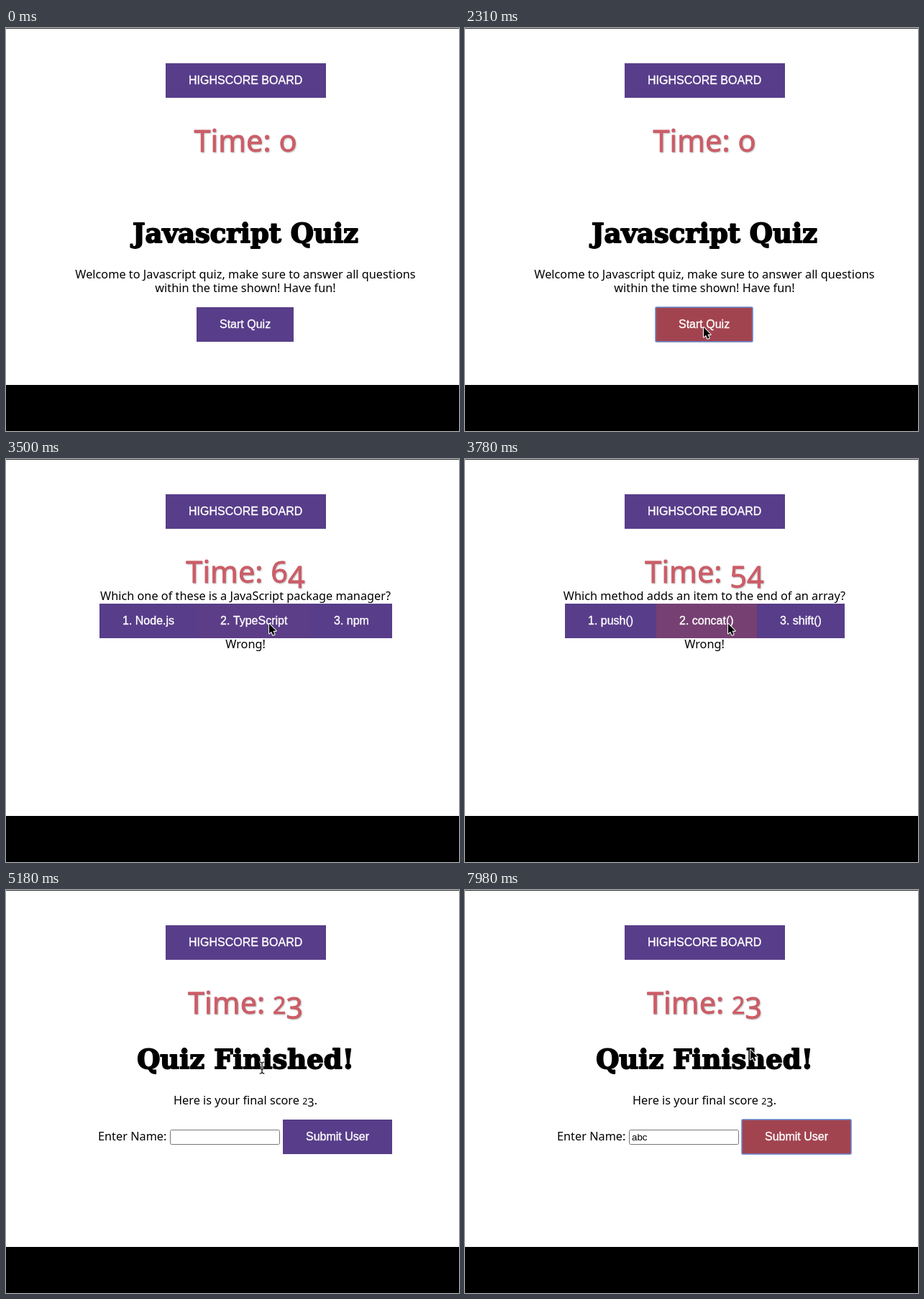
These frames come from a looping animation (630 px wide and 560 px high, 8 s). An HTML page with a canvas:

```html
<!DOCTYPE html>
<html lang="en">
<head>
<meta charset="utf-8">
<title>Javascript Quiz</title>
<style>
  html, body { margin: 0; width: 630px; height: 560px; overflow: hidden; background: #fff; }
  canvas { display: block; }
</style>
</head>
<body>
<canvas id="stage" width="630" height="560"></canvas>
<script>
const g = document.getElementById('stage').getContext('2d');
const LOOP = 8000, STEP = 70, MID = 333;
const SANS = '"Noto Sans", sans-serif', UI = '"Liberation Sans", Arial, sans-serif';
const PURPLE = [88, 61, 138], RED = [162, 68, 80];

// start time, seconds left, question, answers
const questions = [
  [2450, 75, 'What is the correct way to declare a variable in JavaScript?',
    ['1. var colour = 10;', '2. variable colour = 10;', '3. v colour = 10;']],
  [3490, 64, 'Which one of these is a JavaScript package manager?',
    ['1. Node.js', '2. TypeScript', '3. npm']],
  [3710, 54, 'Which method adds an item to the end of an array?',
    ['1. push()', '2. concat()', '3. shift()']],
  [3920, 44, 'Which keyword creates a constant in JavaScript?',
    ['1. let', '2. static', '3. const']],
  [4060, 34, 'What are all the looping structures in Javascript?',
    ['1. For', '2. While', '3. do-while loops']]
];
const FINISH = 4270;

// time, x, y, pointer (0 hidden, 1 arrow, 2 text beam)
const path = [
  [0, 352, 492, 0], [70, 352, 488, 1], [450, 330, 470, 1], [840, 340, 452, 1],
  [1150, 350, 462, 1], [1400, 336, 448, 1], [1680, 336, 448, 1], [2030, 332, 416, 1],
  [2450, 332, 416, 1], [3150, 366, 229, 1], [4270, 366, 229, 1], [4550, 374, 367, 1],
  [4760, 356, 247, 2], [5180, 356, 247, 2], [5390, 392, 312, 1], [5670, 300, 344, 2],
  [6090, 300, 344, 0], [7000, 300, 344, 1], [7350, 430, 345, 1], [7700, 430, 345, 1],
  [7910, 397, 222, 1], [LOOP, 397, 222, 1]
];

const clamp = v => Math.max(0, Math.min(1, v));
const lerp = (a, b, p) => a + (b - a) * p;
const hover = (t, since) => clamp((t - since) / 170);

// Text, thickened by an outline of the given width
function text(str, x, y, font, color = '#000', outline = 0) {
  g.font = font;
  g.fillStyle = g.strokeStyle = color;
  g.lineJoin = 'round';
  g.lineWidth = outline;
  if (outline) g.strokeText(str, x, y);
  g.fillText(str, x, y);
}

// Sans text with old-style figures; centred unless a left edge is given
function say(str, y, { size = 16.3, color, left, outline } = {}) {
  const runs = str.match(/\d|\D+/g).map(s => {
    const font = `${size * ('12'.includes(s) ? .77 : 1)}px ${SANS}`;
    const glyphs = s === '0' ? 'o' : s;
    g.font = font;
    return { glyphs, font, drop: '34579'.includes(s) ? size * .17 : 0, width: g.measureText(glyphs).width };
  });
  let x = left ?? MID - runs.reduce((sum, r) => sum + r.width, 0) / 2;
  for (const r of runs) {
    text(r.glyphs, x, y + r.drop, r.font, color, outline);
    x += r.width;
  }
}

function heading(str, y) {
  g.textAlign = 'center';
  text(str, MID, y, 'bold 37px "DejaVu Serif", serif', '#000', 1.8);
  g.textAlign = 'left';
}

function frame(x, y, w, h, color, width, radius) {
  g.beginPath();
  g.roundRect(x, y, w, h, radius);
  g.strokeStyle = color;
  g.lineWidth = width;
  g.stroke();
}

function buttonWidth(label) {
  g.font = `16px ${UI}`;
  return Math.round(g.measureText(label).width + 64.3);
}

function button(label, x, y, heat = 0, focused = false) {
  const w = buttonWidth(label);
  g.fillStyle = `rgb(${PURPLE.map((c, i) => lerp(c, RED[i], heat))})`;
  g.fillRect(x, y, w, 48);
  if (focused) frame(x, y, w, 48, 'rgba(105,135,205,.8)', 2, 2);
  text(label, x + 32, y + 29, g.font, '#fff', .35);
  return w;
}

function timer(seconds) {
  g.shadowColor = 'rgba(90,90,90,.3)';
  g.shadowOffsetX = g.shadowOffsetY = 1;
  g.shadowBlur = 2;
  say('Time: ' + seconds, 172, { size: 41.5, color: '#cd5c67', outline: .8 });
  g.shadowColor = 'transparent';
}

function startPage(t) {
  timer(0);
  heading('Javascript Quiz', 298);
  say('Welcome to Javascript quiz, make sure to answer all questions', 348);
  say('within the time shown! Have fun!', 367);
  button('Start Quiz', 265, 388, hover(t, 1820), t >= 2240);
}

function questionPage(t, pointerX, pointerY) {
  const n = questions.findLastIndex(q => t >= q[0]);
  const [start, seconds, title, answers] = questions[n];
  timer(n === 0 && t >= 3000 ? seconds - 1 : seconds);
  say(title, 195.5);
  const widths = answers.map(buttonWidth);
  let x = Math.round(MID - widths.reduce((a, b) => a + b) / 2);
  answers.forEach((a, i) => {
    const over = pointerY > 201 && pointerY < 249 && pointerX >= x && pointerX < x + widths[i];
    x += button(a, x, 201, over ? hover(t, Math.max(start, 3000)) : 0);
  });
  if (n > 0) say('Wrong!', 263);
}

function finishPage(t) {
  timer(23);
  heading('Quiz Finished!', 248);
  say('Here is your final score 23.', 298);
  say('Enter Name:', 348, { left: 128 });
  const typing = t >= 5810 && t < 7420;
  if (typing) frame(229, 334, 151, 19, '#2c62ae', 2, 2);
  else frame(228.5, 333.5, 152, 20, '#767676', 1, 2);
  const typed = 'abc'.slice(0, (t >= 6300) + (t >= 6580) + (t >= 6860));
  text(typed, 232, 348, `13.33px ${UI}`);
  if (typing) g.fillRect(232 + Math.round(g.measureText(typed).width), 336, 1, 15);
  button('Submit User', 385, 319, hover(t, 7210), t >= 7420);
}

function pointerAt(t) {
  const i = path.findLastIndex(k => t >= k[0]);
  const a = path[i], b = path[i + 1];
  const p = clamp((t - a[0]) / (b[0] - a[0])), e = p * p * (3 - 2 * p);
  return [lerp(a[1], b[1], e), lerp(a[2], b[2], e), a[3]];
}

function drawPointer(x, y, kind) {
  if (!kind) return;
  const shape = new Path2D(kind === 1
    ? 'M0 0V14.5L3.3 11.5L5.6 17L8.2 15.9L5.9 10.6H10.4Z'
    : 'M-3.5 -8Q0 -8 0 -5.5Q0 -8 3.5 -8M0 -5.5V5.5M-3.5 8Q0 8 0 5.5Q0 8 3.5 8M-2 2H2');
  g.save();
  g.translate(x, y);
  if (kind === 1) g.scale(.93, .93);
  g.lineJoin = 'round';
  g.strokeStyle = '#fff';
  g.lineWidth = kind === 1 ? 2.2 : 3;
  g.stroke(shape);
  g.fillStyle = g.strokeStyle = '#000';
  g.lineWidth = 1.2;
  kind === 1 ? g.fill(shape) : g.stroke(shape);
  g.restore();
}

function draw(now) {
  const t = Math.floor(now % LOOP / STEP) * STEP;
  const [x, y, kind] = pointerAt(t);
  g.fillStyle = '#fff';
  g.fillRect(0, 0, 630, 560);
  g.fillStyle = '#333';
  g.fillRect(0, 0, 630, 1);
  g.fillStyle = '#000';
  g.fillRect(0, 496, 630, 64);
  button('HIGHSCORE BOARD', 222, 49);
  if (t < questions[0][0]) startPage(t);
  else if (t < FINISH) questionPage(t, x, y);
  else finishPage(t);
  drawPointer(x, y, kind);
}

const began = performance.now();
function tick() {
  draw(performance.now() - began);
  requestAnimationFrame(tick);
}
tick();
</script>
</body>
</html>
```
